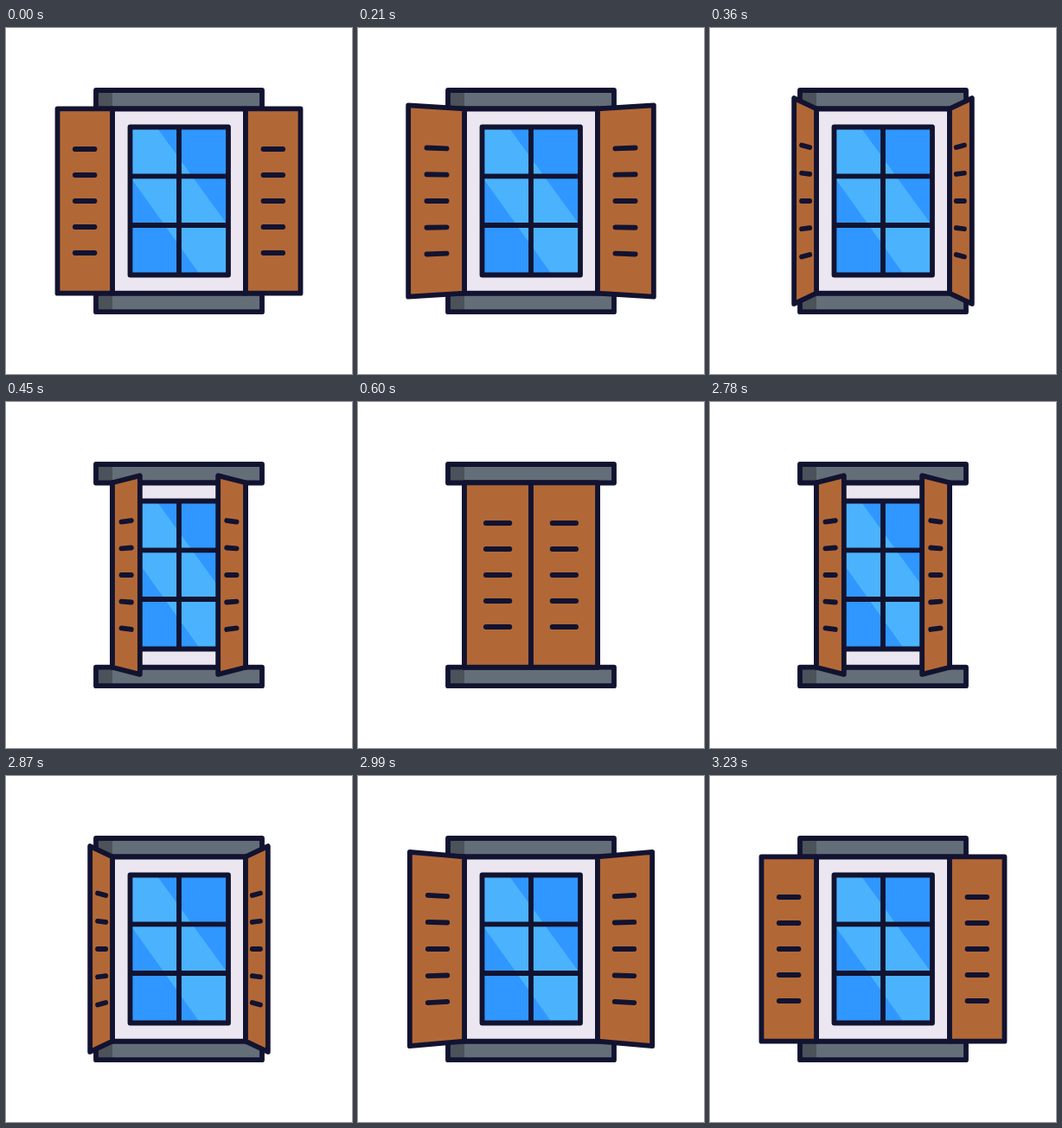
An HTML page for the animation above (4260 ms loop, 400 by 400 pixels).

```html
<!DOCTYPE html>
<html lang="en">
<head>
<meta charset="utf-8">
<title>Window shutters</title>
<style>
  html, body { margin: 0; width: 100%; height: 100%; overflow: hidden; background: #fff; }
  svg { display: block; width: 100%; height: 100%; }
  .line { stroke: #121331; stroke-width: 5.8; stroke-linecap: round; stroke-linejoin: round; }
</style>
</head>
<body>
<svg viewBox="0 0 400 400">
  <defs>
    <g id="sill">
      <path d="M104 72H296V93.5H104Z" fill="#646e78"/>
      <path d="M104 72H123V93.5H104Z" fill="#4b5259"/>
      <path class="line" d="M104 72H296V93.5H104Z" fill="none"/>
    </g>
  </defs>

  <use href="#sill"/>
  <use href="#sill" y="234.7"/>
  <path class="line" d="M123 93.5H277V306.7H123Z" fill="#ebe6ef"/>

  <path d="M143.5 114.5H257V285.5H143.5Z" fill="#2f97ff"/>
  <path d="M143.5 114.5H174L257 229V285.5H224.5L143.5 172Z" fill="#4bb3fd"/>
  <path class="line" d="M143.5 114.5H257V285.5H143.5ZM200 114.5V285.5M143.5 171.3H257M143.5 228H257" fill="none"/>

  <g id="shutter">
    <path id="panel" class="line" fill="#b26836"/>
    <path id="slats" class="line" fill="none"/>
  </g>
  <use href="#shutter" transform="matrix(-1 0 0 1 400 0)"/>
</svg>
<script>
  const LOOP = 4260, STEP = 30, STEPS = 20, OPEN_AT = 2660;
  const CENTER = 200, HINGE = 77, HALF_HEIGHT = 106.7;
  const OUTER_WIDTH = 63.5, INNER_WIDTH = 77;
  const SLAT_START = 0.323, SLAT_END = 0.68;
  const SLAT_ROWS = [-60, -30, 0, 30, 60];

  const panel = document.getElementById('panel');
  const slats = document.getElementById('slats');
  const mix = (a, b, k) => a + (b - a) * k;

  // Both projections map (share of the width, offset from mid height) to the stage.
  function swingOutside(step) {
    const angle = Math.PI / 2 * Math.min(1, (step * STEP / 385) ** 2.5);
    return (u, y) => {
      const reach = u * OUTER_WIDTH;
      const scale = 1 / (1 - reach * Math.sin(angle) / 600);
      return [CENTER - (HINGE + reach * Math.cos(angle)) * scale, CENTER + y * scale];
    };
  }

  function swingInside(step) {
    const turn = ((STEPS - step) / 7) ** 2;
    return (u, y) => {
      const reach = u * INNER_WIDTH;
      const scale = 1 / (1 - reach / 592);
      return [
        mix(CENTER - HINGE + reach, CENTER - HINGE * scale, turn),
        CENTER + y * mix(1, scale, turn)
      ];
    };
  }

  function draw(step, opening) {
    const inside = step > (opening ? 13 : 12);
    const place = inside ? swingInside(step) : swingOutside(step);
    const point = (u, y) => place(u, y).map(v => v.toFixed(2)).join(' ');
    const h = HALF_HEIGHT;
    panel.setAttribute('d',
      `M${point(0, -h)}L${point(1, -h)}L${point(1, h)}L${point(0, h)}Z`);
    slats.setAttribute('d', SLAT_ROWS.map(y =>
      `M${point(SLAT_START, y)}L${point(SLAT_END, y)}`).join(''));
  }

  function frame() {
    const time = performance.now() % LOOP;
    const opening = time >= OPEN_AT;
    const step = opening
      ? Math.max(0, STEPS - 1 - Math.floor((time - OPEN_AT) / STEP))
      : Math.min(STEPS, Math.floor(time / STEP));
    draw(step, opening);
    requestAnimationFrame(frame);
  }
  frame();
</script>
</body>
</html>
```
